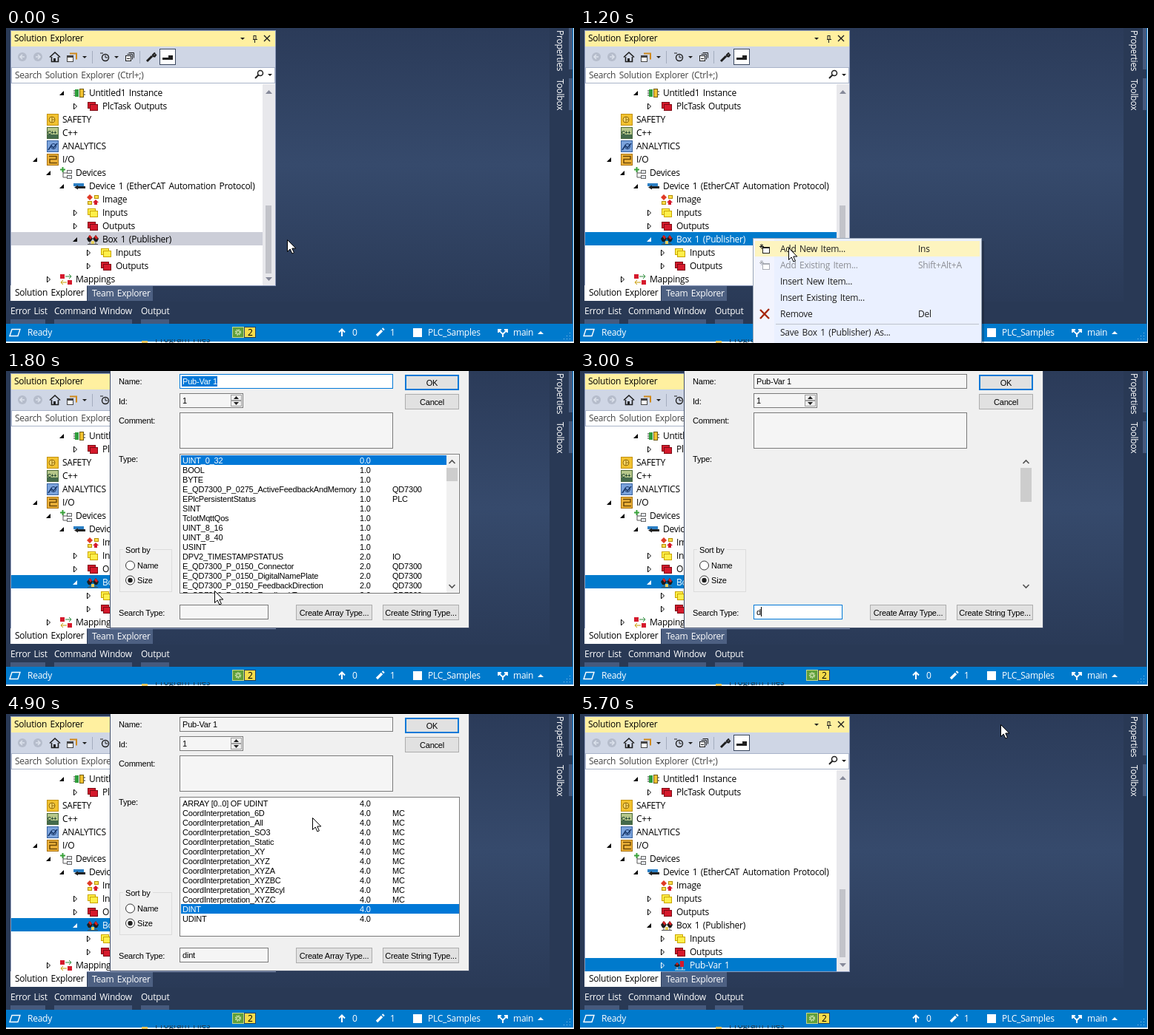
An HTML page that plays this animation: 766 by 426 pixels, repeating every 7.7 s.

```html
<!DOCTYPE html>
<html lang="en">
<head>
<meta charset="utf-8">
<title>Add a variable</title>
<style>
html, body { margin: 0; width: 100%; height: 100%; overflow: hidden; background: #293955; }
svg { display: block; }
rect { shape-rendering: crispEdges; }
text { font: 12px "Open Sans", "Noto Sans", sans-serif; letter-spacing: -.25px; word-spacing: 1.6px; }
.dlg text { font: 11px "Liberation Sans", Arial, sans-serif; letter-spacing: -.2px; word-spacing: 0; }
text.mini { font: bold 7px "Liberation Sans", sans-serif; letter-spacing: -.5px; }
</style>
</head>
<body>
<svg id="stage" width="766" height="426" viewBox="0 0 766 426"></svg>
<script>
const BLUE = '#007acc', SEL = '#0078d7', INK = '#1e1e1e', LOOP = 7700, STEP = 100;

const rect = (x, y, w, h, fill) => `<rect x="${x}" y="${y}" width="${w}" height="${h}" fill="${fill}"/>`;
const frame = (x, y, w, h, fill, line) => rect(x, y, w, h, line) + rect(x + 1, y + 1, w - 2, h - 2, fill);
const text = (x, y, s, fill = '#000', extra = '') => `<text x="${x}" y="${y}" fill="${fill}" ${extra}>${s}</text>`;
const fillPath = (d, fill) => `<path d="${d}" fill="${fill}"/>`;
const line = (d, color, w = 1) => `<path d="${d}" fill="none" stroke="${color}" stroke-width="${w}"/>`;
const circle = (x, y, r, fill, stroke = 'none', w = 1) =>
  `<circle cx="${x}" cy="${y}" r="${r}" fill="${fill}" stroke="${stroke}" stroke-width="${w}"/>`;
const at = (x, y, s) => `<g transform="translate(${x} ${y})">${s}</g>`;
const caret = (x, y, fill = INK) => fillPath(`M${x - 3} ${y - 1}h6l-3 3z`, fill);

// Tree icons, centred on 0,0
const pair = (c, edge) => frame(-7, -6, 11, 9, c, edge) + frame(-4, -3, 11, 9, c, edge);
const tile = (a, b, mark) => frame(-8, -8, 16, 16, a, b) + mark;
const pods = fillPath('M-8-1l4-5 4 5-3 4h-3zM0-1l4-5 4 5-2 4H3z', '#1c1c1c') +
  fillPath('M-6-4l2-2 3 3-2 3zM2-3l2-3 3 4-2 2z', '#d32020') +
  line('M-4 3v3M4 3v3M-7 6.5h14', '#555') + rect(-2, 2, 4, 4, '#e8d05a');
const icons = {
  plc: rect(-6, -5, 5, 10, '#2f9e3c') + frame(0, -6, 6, 12, '#f3c231', '#6d5a12') + line('M-8-3h2M-8 0h2M-8 3h2M6-2h2M6 2h2', '#333'),
  yellow: pair('#ffef4a', '#c9a400'),
  red: pair('#d5192c', '#7d0a14'),
  safety: tile('#f2c230', '#c39210', circle(-1, 0, 4, '#f7d768', '#946c09') + line('M-1-4v8M-1 0h4', '#946c09')),
  cpp: tile('#b7c88b', '#4b6a3c', rect(-7, 2, 14, 5, '#446a4c') + text(-7, 2, 'C++', '#173c2c', 'class="mini"')),
  chart: tile('#7ba3dc', '#3863a2', line('M-6 5L-2-1l3 3 5-6', '#173668', 1.5) + circle(1, 0, 3.5, 'none', '#173668')),
  io: tile('#efb43c', '#a8700e', line('M-5-4.5h10v4h-9v5h10', '#6d4705', 1.5)),
  net: line('M-4-4v10h6M-4 0h6', '#555') + line('M-8-4.5h7M-4.5-8v7', '#3aa33c', 2) +
    frame(1, -4, 7, 5, '#e4e8ee', '#666') + frame(1, 3, 7, 5, '#e4e8ee', '#666'),
  card: rect(-8, -4, 14, 4, '#2b7fc4') + rect(-3, 0, 11, 3, '#222') + fillPath('M-7 1.5l5-3v6z', '#222'),
  image: fillPath('M-4-7l4 4-4 4-4-4z', '#e03a26') + frame(2, -6, 6, 5, '#ffdf4c', '#b38d00') +
    frame(-7, 2, 6, 5, '#ffdf4c', '#b38d00') + fillPath('M4 0l4 4H6v3H2V4H0z', '#d5192c'),
  box: pods,
  map: rect(-8, -7, 6, 6, '#d5192c') + rect(2, 1, 6, 6, '#d5192c') + line('M-1-4h8M4-7l3 3-3 3', '#2b8a3a') + line('M1 4h-8M-4 1l-3 3 3 3', '#c79a00'),
  pub: fillPath('M-8 0l4-4 4 4-4 3z', '#222') + rect(0, -6, 5, 8, '#d5192c') + fillPath('M-6-2l2-2 2 2-2 2z', '#d32020') + line('M-4 2v4M3 2v4M-7 6h14', '#ddd')
};

// [level, expander (1 open, 0 closed, -1 none), icon, label]
const tree = [
  [2, 1, 'plc', 'Untitled1 Instance'], [3, 0, 'red', 'PlcTask Outputs'],
  [0, -1, 'safety', 'SAFETY'], [0, -1, 'cpp', 'C++'], [0, -1, 'chart', 'ANALYTICS'],
  [0, 1, 'io', 'I/O'], [1, 1, 'net', 'Devices'],
  [2, 1, 'card', 'Device 1 (EtherCAT Automation Protocol)'],
  [3, -1, 'image', 'Image'], [3, 0, 'yellow', 'Inputs'], [3, 0, 'red', 'Outputs'],
  [3, 1, 'box', 'Box 1 (Publisher)'], [4, 0, 'yellow', 'Inputs'], [4, 0, 'red', 'Outputs']
];
const lastRow = [1, 0, 'map', 'Mappings'], newRow = [4, 0, 'pub', 'Pub-Var 1'];

function treeView(t) {
  const added = t >= 5400, selected = added ? 14 : 11;
  const selFill = t < 600 ? '#ccced8' : BLUE;
  return [...tree, added ? newRow : lastRow].map(([level, open, icon, label], i) => {
    const y = 88 + 18 * i, x = 39 + 18 * level, on = i === selected;
    const ink = on && t >= 600 ? '#fff' : '#000';
    return (on ? rect(7, y - 10, 339, 18, selFill) : '') +
      (open === 1 ? fillPath(`M${x + 3} ${y - 3}v6h-6z`, ink) : '') +
      (open === 0 ? line(`M${x - 1.5} ${y - 4}l4 4-4 4z`, ink) : '') +
      at(x + 24, y, icons[icon]) + text(x + 37, y + 4, label, ink);
  }).join('');
}

function toolbar() {
  const arrow = x => circle(x, 39, 6, '#b5bccb') + line(`M${x - 3} 39h6`, '#dde2ec', 1.5);
  return arrow(22) + line('M22 36l-3 3 3 3', '#dde2ec', 1.5) + arrow(43) + line('M43 36l3 3-3 3', '#dde2ec', 1.5) +
    line('M59 39.5l7-6.5 7 6.5M61.5 39v6.5h9V39', INK, 1.6) + rect(64, 41, 3, 5, INK) +
    frame(82, 37, 9, 9, '#fff', '#444') + rect(83, 38, 7, 2, '#444') + line('M86 34.5h9v8', '#d08a1c', 2) +
    caret(106, 39) + rect(116, 31, 1, 17, '#a4adbe') +
    circle(134, 40, 4.5, 'none', INK, 1.4) + line('M134 37v3h3M127 34h4', INK) + caret(149, 39) +
    frame(161, 37, 8, 8, '#f5f7fb', INK) + rect(163, 41, 4, 1, INK) + line('M163.5 35.5h7v7M165.5 33.5h7v7', INK) +
    rect(180, 31, 1, 17, '#a4adbe') +
    line('M190 45l7-7', INK, 3) + line('M201 33.5l-3 3 .5 1.5 2 .5 2-3', INK, 2.3) +
    frame(207, 28, 22, 22, '#fff', '#39465e') + rect(211, 40, 14, 3, INK) + rect(219, 37, 6, 3, INK);
}

function mainWindow(t) {
  const thumb = t >= 5400 ? 237 : 240;
  const side = (y, h, s) => rect(759, y, 5, h, '#465a7d') + text(0, 0, s, '#fff', `transform="translate(743 ${y ? 69 : 3}) rotate(90)"`);
  const tab = (x, w, s) => text(x, 387, s, '#fff') + rect(x, 394, w, 6, '#465a7d');
  return `<defs><linearGradient id="bg" x2="0" y2="1"><stop stop-color="#2b3b59"/>
    <stop offset=".5" stop-color="#364a6c"/><stop offset="1" stop-color="#2a3a57"/></linearGradient></defs>` +
    rect(0, 0, 766, 426, '#293955') + rect(6, 0, 727, 370, 'url(#bg)') +
    side(0, 56, 'Properties') + side(68, 43, 'Toolbox') +
    frame(6, 3, 358, 346, '#fff', '#8e9bbc') + rect(7, 4, 356, 21, '#fff0a0') +
    text(11, 18, 'Solution Explorer') + caret(319, 14) +
    line('M333 15.5h6M334 10v5M337 10v5M334 10.5h3M335.5 16v4', INK) + line('M348 10l8 8M356 10l-8 8', INK, 1.4) +
    rect(7, 25, 356, 50, '#cfd6e5') + toolbar() +
    frame(7, 53, 356, 22, '#fff', '#a9b4c9') + text(12, 68, 'Search Solution Explorer (Ctrl+;)', '#444') +
    circle(343, 61, 3.5, 'none', INK, 1.5) + line('M340.5 63.5l-4.5 4.5', INK, 2) + caret(356, 63) +
    treeView(t) +
    rect(346, 76, 17, 272, '#e8e8ec') + rect(350, thumb, 8, 92, '#c2c3c9') +
    fillPath('M350 89l4.5-5 4.5 5zM350 337l4.5 5 4.5-5z', '#868999') +
    rect(6, 348, 103, 21, '#fff') + text(12, 362, 'Solution Explorer') +
    rect(110, 349, 88, 20, '#4d6082') + text(116, 363, 'Team Explorer', '#fff') +
    tab(6, 47, 'Error List') + tab(65, 105, 'Command Window') + tab(182, 38, 'Output');
}

function statusBar(t) {
  const spin = t % 400 < 200 ? 0 : 22.5;
  return rect(0, 400, 765, 24, BLUE) + rect(0, 424, 766, 2, '#f4f6f8') +
    rect(764, 0, 1, 424, BLUE) + rect(765, 0, 1, 426, '#e6e9ef') +
    rect(183, 423, 8, 3, '#e9c45a') +
    `<svg y="421" width="300" height="5">${text(201, 4, 'Program Files', '#23384a')}</svg>` +
    line('M8 407.5h11l-3 9H5z', '#fff', 1.4) +
    (t >= 5400 && t < 5600 ? '' : text(29, 416, 'Ready', '#fff')) +
    frame(305, 404, 16, 15, '#5f9f3a', '#c9d88a') + frame(321, 404, 16, 15, '#f6dc4a', '#23415e') +
    `<circle cx="313" cy="411.5" r="3.2" fill="none" stroke="#cfe3b0" stroke-width="2" stroke-dasharray="1.5 1.01" transform="rotate(${spin} 313 411.5)"/>` +
    circle(313, 411.5, 2, 'none', '#cfe3b0') + text(326, 416, '2') +
    line('M453 417v-9M449 411.5l4-4 4 4', '#fff', 2) + text(467, 416, '0', '#fff') +
    line('M500 416l7-7', '#fff', 3.4) + line('M508 408l1.5-1.5', '#fff', 3.4) + text(518, 416, '1', '#fff') +
    rect(549, 406, 12, 12, '#fff') + text(569, 416, 'PLC_Samples', '#fff') +
    line('M670 418v-4l-5-5M670 414l5-5M664 412v-4h4M672 408h4v4', '#fff', 1.8) +
    text(684, 416, 'main', '#fff') + fillPath('M717 414l4-4 4 4z', '#fff') +
    [0, 1, 2].map(i => rect(760 - 4 * i, 420, 1, 1, '#8cc4ec') + rect(760, 420 - 4 * i, 1, 1, '#8cc4ec')).join('') + rect(756, 416, 1, 1, '#8cc4ec');
}

function menu(t) {
  const items = [['Add New Item...', 'Ins'], ['Add Existing Item...', 'Shift+Alt+A'], ['Insert New Item...'], ['Insert Existing Item...'], ['Remove', 'Del']];
  const add = (y, c) => frame(246, y - 3, 10, 9, '#fff', c) + rect(247, y - 2, 8, 1, c) + line(`M242 ${y - 3.5}h6M245 ${y - 7}v7M243 ${y - 6}l4 4M247 ${y - 6}l-4 4`, c);
  return rect(237, 288, 308, 138, '#0003') + frame(233, 284, 309, 150, '#eaf0ff', '#9ba7b7') +
    rect(234, 285, 28, 141, '#f2f4fe') +
    (t >= 900 ? rect(236, 288, 303, 21, '#fdf4bf') : '') +
    items.map(([label, key = ''], i) => {
      const y = 303 + 22 * i, ink = i === 1 ? '#8c8e94' : INK;
      return text(270, y, label, ink) + text(456, y, key, ink);
    }).join('') +
    add(299, INK) + add(321, '#aaadb5') + line('M243 381l12 12M255 380l-12 13', '#a5260b', 2.4) +
    rect(264, 400, 274, 1, '#bec3cb') + text(270, 416, 'Save Box 1 (Publisher) As...', INK);
}

const drive = 'QD7300', E = `E_${drive}_P_`;
const allTypes = [
  ['UINT_0_32'], ['BOOL'], ['BYTE'], [E + '0275_ActiveFeedbackAndMemory', drive], ['EPlcPersistentStatus', 'PLC'],
  ['SINT'], ['TcIotMqttQos'], ['UINT_8_16'], ['UINT_8_40'], ['USINT'], ['DPV2_TIMESTAMPSTATUS', 'IO'],
  ...['Connector', 'DigitalNamePlate', 'FeedbackDirection', 'FeedbackType'].map(s => [E + '0150_' + s, drive])
].map(([name, group], i) => [name, i === 0 ? '0.0' : i < 10 ? '1.0' : '2.0', group]);
const foundTypes = [
  ['ARRAY [0..0] OF UDINT'],
  ...'6D All SO3 Static XY XYZ XYZA XYZBC XYZBcyl XYZC'.split(' ').map(s => ['CoordInterpretation_' + s, 'MC']),
  ['DINT'], ['UDINT']
].map(([name, group]) => [name, '4.0', group]);

function typeList(t) {
  const found = t >= 3500, empty = t >= 3000 && !found;
  const selected = t < 3000 ? 0 : t >= 4500 ? 11 : -1;
  const thumb = t < 3000 ? 18 : 46;
  const rows = empty ? [] : found ? foundTypes : allTypes;
  return (empty ? '' : frame(234, 112, 378, 189, '#fff', '#7a7a7a')) +
    '<svg width="611" height="300">' + rows.map(([name, size, group = ''], i) => {
      const y = 125 + 13 * i, on = i === selected, ink = on ? '#fff' : '#000';
      return (on ? rect(236, y - 11, found ? 375 : 358, 13, SEL) : '') +
        text(238, y, name, ink) + text(477, y, size, ink) + text(521, y, group, ink);
    }).join('') + '</svg>' +
    (found ? '' : rect(594, 114, 16, 186, '#f0f0f0') + rect(594, 131, 15, thumb, '#cdcdcd') +
      line('M597.5 125l4-4 4 4M597.5 289l4 4 4-4', '#505050', 1.6));
}

function dialog(t) {
  const field = (x, y, w, h, focus) => frame(x, y, w, h, focus ? '#fff' : '#f5f5f5', focus ? SEL : '#7a7a7a');
  const button = (x, y, w, label, fill = '#e1e1e1', edge = '#adadad', ink = '#000', border = 1) =>
    rect(x, y, w, 21, edge) + rect(x + border, y + border, w - 2 * border, 21 - 2 * border, fill) +
    text(x + w / 2, y + 15, label, ink, 'text-anchor="middle"');
  const typed = 'dint'.slice(0, t < 3000 ? 0 : 1 + Math.floor((t - 3000) / 200));
  const focused = t >= 2500 && t < 4500, naming = t < 2500;
  const caretX = 238 + [0, 6, 8, 14, 17][typed.length];
  const ok = t >= 5300 ? ['#cce4f7', SEL] : t >= 3200 && t < 4500 ? ['#cccccc', '#bfbfbf', '#838383'] : ['#e1e1e1', SEL, '#000', 2];
  const radio = (y, label, on) => circle(167.5, y, 6, '#fff', '#333') + (on ? circle(167.5, y, 3.2, '#222') : '') + text(177, y + 4, label);
  return '<g class="dlg">' + rect(140, 0, 485, 348, '#43506a') + rect(141, 0, 483, 347, '#f0f0f0') +
    text(152, 18, 'Name:') + text(152, 45, 'Id:') + text(152, 71, 'Comment:') + text(152, 123, 'Type:') + text(152, 331, 'Search Type:') +
    field(234, 4, 288, 20, naming) + (naming ? rect(237, 7, 48, 14, SEL) : '') + text(238, 18, 'Pub-Var 1', naming ? '#fff' : '#000') +
    field(234, 30, 86, 20) + text(238, 44, '1') +
    frame(303, 32, 15, 8, '#f0f0f0', '#a0a0a0') + frame(303, 40, 15, 8, '#f0f0f0', '#a0a0a0') +
    fillPath('M307 38l3.5-4 3.5 4zM307 42l3.5 4 3.5-4z', '#222') +
    field(234, 56, 288, 49) +
    button(538, 5, 73, 'OK', ...ok) + button(538, 31, 73, 'Cancel') +
    typeList(t) +
    frame(153, 241, 71, 58, '#f0f0f0', '#dcdcdc') + rect(158, 238, 40, 8, '#f0f0f0') + text(161, 246, 'Sort by') +
    radio(263, 'Name', false) + radio(283, 'Size', true) +
    field(234, 316, 120, 20, focused) + text(238, 330, typed) +
    (focused && t % 1000 < 600 && t < 4200 ? rect(caretX, 319, 1, 13, '#000') : '') +
    button(391, 316, 103, 'Create Array Type...') + button(508, 316, 103, 'Create String Type...') + '</g>';
}

// Pointer path: time, x, y
const path = [[0, 379, 286], [600, 233, 284], [800, 233, 284], [1200, 281, 297], [1900, 281, 297], [2400, 291, 326],
  [3700, 291, 326], [4300, 258, 265], [4500, 258, 265], [5300, 567, 14], [LOOP, 567, 14]];

function pointer(t) {
  if (t >= 3000 && t < 3800) return '';
  const i = path.findIndex(p => p[0] > t), [t0, x0, y0] = path[i - 1], [t1, x1, y1] = path[i];
  const k = (t - t0) / (t1 - t0), e = k * k * (3 - 2 * k);
  const x = x0 + (x1 - x0) * e, y = y0 + (y1 - y0) * e;
  const inField = t >= 1600 && x > 234 && x < 354 && y > 316 && y < 336;
  return at(Math.round(x), Math.round(y), inField
    ? line('M-3-7.5h2.5l.5.5.5-.5H3M0-7v14M-3 7.5h2.5l.5-.5.5.5H3', '#000')
    : '<path d="M.5.5v16l3.7-3.5 2.7 6 2.5-1.1-2.6-5.9h5z" fill="#fff" stroke="#000"/>');
}

const stage = document.getElementById('stage');
let shown = -1;
function tick(now) {
  const t = Math.floor(now % LOOP / STEP) * STEP;
  if (t !== shown) {
    shown = t;
    stage.innerHTML = mainWindow(t) + statusBar(t) +
      (t >= 800 && t < 1400 ? menu(t) : '') +
      (t >= 1600 && t < 5600 ? dialog(t) : '') + pointer(t);
  }
  requestAnimationFrame(tick);
}
tick(0);
</script>
</body>
</html>
```
